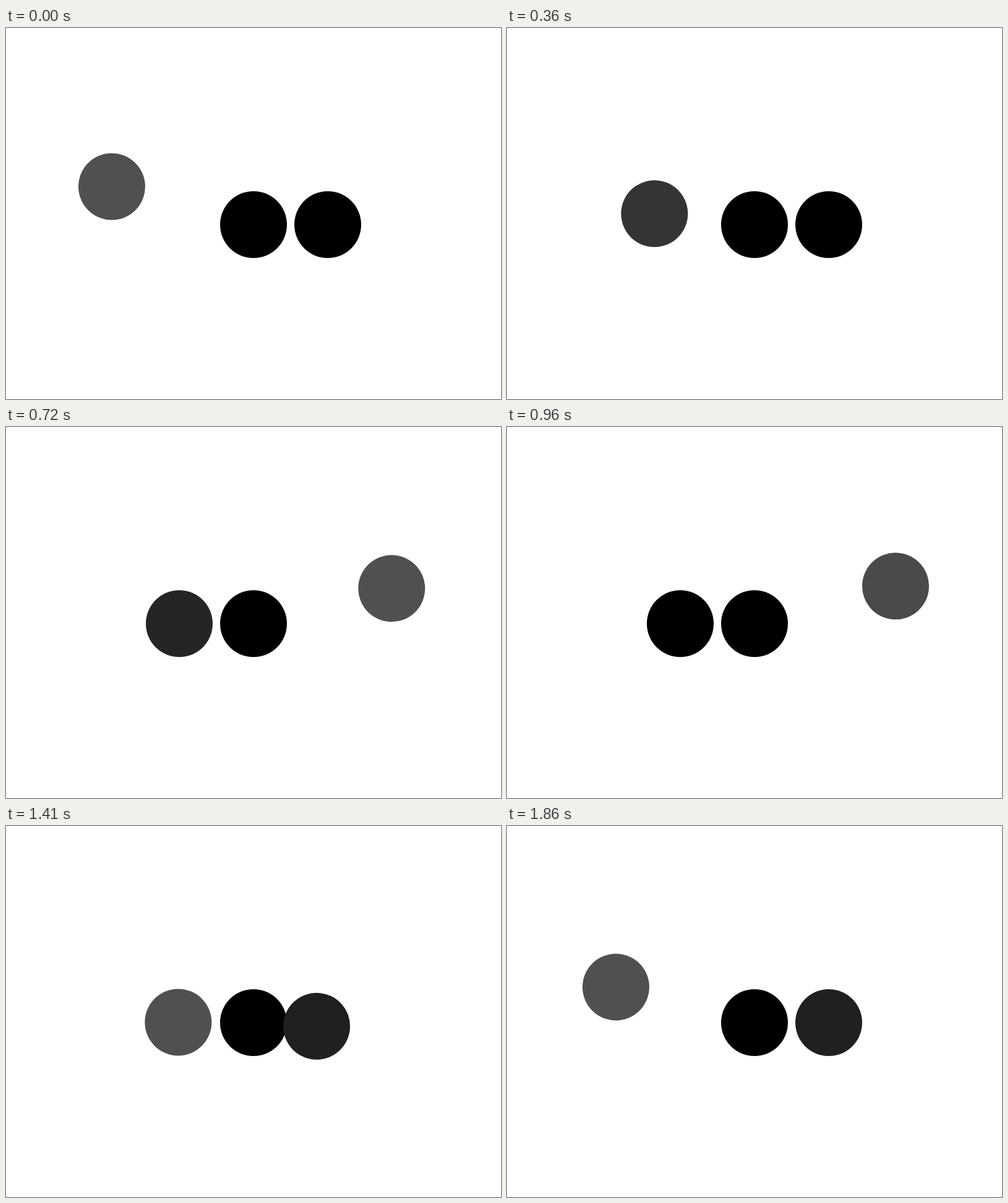
Recreate the animation shown at these times as an HTML page. Size 800 px wide and 600 px high, loop 1890 ms.

```html
<!DOCTYPE html>
<html>
<head>
<meta charset="utf-8">
<style>
html, body { margin: 0; height: 100%; overflow: hidden; background: #fff; }
svg { display: block; }
</style>
</head>
<body>
<svg width="800" height="600">
  <circle cx="280" cy="318" r="54"/>
  <circle cx="400" cy="318" r="54"/>
  <circle cx="520" cy="318" r="54"/>
</svg>
<script>
const LOOP = 1890, STEP = 30;
const HIT1 = 450, DROP2 = 840, HIT2 = 1408, DROP3 = 1738;
const balls = document.querySelectorAll('circle');

const span = (t, start, length) => Math.min(1, Math.max(0, (t - start) / length));
const mix = (a, b, u) => a + (b - a) * u;
const easeOut = u => 1 - (1 - u) ** 2.4;
const easeInOut = u => u < 0.5 ? 2 * u * u : 1 - 2 * (1 - u) ** 2;

// Each pose is [outward swing in degrees, grey level].
function left(t) {
  if (t < HIT1) {
    const u = span(t, 0, HIT1);
    return [mix(20, -5, u ** 3), mix(80, 37, u ** 1.92)];
  }
  if (t < HIT2) return [mix(-5, 0, easeInOut(span(t, HIT1, 260))), t < 900 ? 37 : 0];
  if (t < DROP3) return [19.2 * easeOut(span(t, HIT2, DROP3 - HIT2)), 80];
  return [mix(19.2, -3, span(t, DROP3, 560) ** 3), 80];
}

function middle(t) {
  const first = Math.sin(Math.PI * span(t, HIT1, 260));
  const second = Math.sin(Math.PI * span(t, HIT2, 375));
  return [0.7 * second - 0.85 * first, 58 * (first + second)];
}

function right(t) {
  if (t < HIT1) return [0, 0];
  if (t < DROP2) return [20 * easeOut(span(t, HIT1, DROP2 - HIT1)), 80];
  if (t < HIT2) {
    const u = span(t, DROP2, HIT2 - DROP2);
    return [mix(20, -3, u ** 3), mix(80, 32, u ** 1.34)];
  }
  return [mix(-3, 0, easeInOut(span(t, HIT2, 375))), 32];
}

function place(ball, [swing, grey], side) {
  const g = Math.round(grey);
  ball.setAttribute('transform', `rotate(${-side * swing} 400 -22)`);
  ball.setAttribute('fill', `rgb(${g},${g},${g})`);
}

const begin = performance.now();
function draw() {
  const t = Math.floor((performance.now() - begin) % LOOP / STEP) * STEP;
  place(balls[0], left(t), -1);
  place(balls[1], middle(t), -1);
  place(balls[2], right(t), 1);
  requestAnimationFrame(draw);
}
draw();
</script>
</body>
</html>
```
